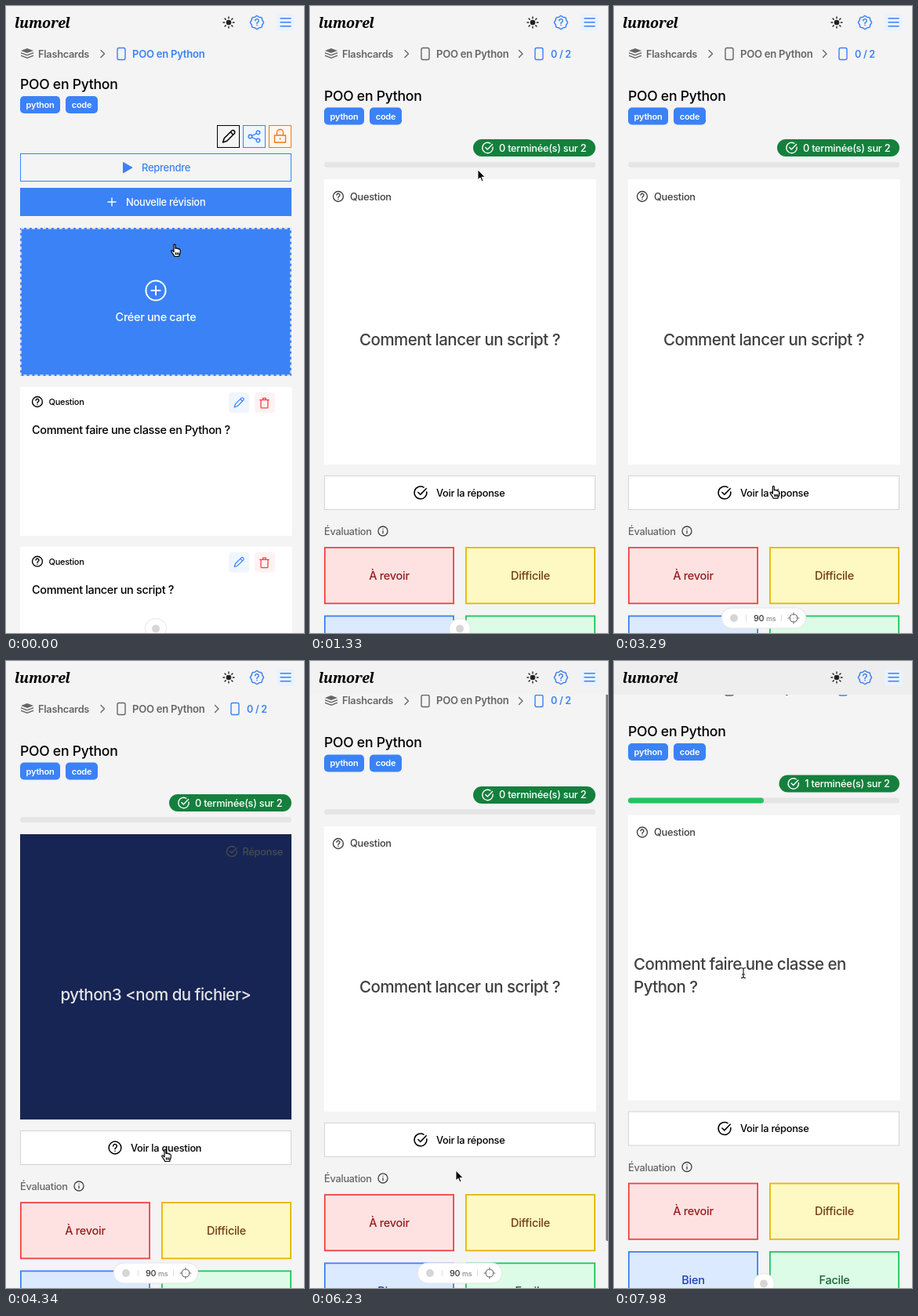
These frames come from a looping animation (380 by 800 pixels, 8 s). An HTML page:

```html
<!DOCTYPE html>
<html lang="fr">
<head>
<meta charset="utf-8">
<title>Flashcards</title>
<style>
html, body { margin: 0; height: 100%; overflow: hidden; background: #f4f4f4; }
svg { display: block; font-family: Inter, "Open Sans", sans-serif; letter-spacing: -.017em; }
text { white-space: pre; }
</style>
</head>
<body>
<svg id="stage" width="380" height="800" viewBox="0 0 380 800"></svg>
<script>
const BLUE = '#3b82f6', GREY = '#666', INK = '#404040';
const stage = document.getElementById('stage');

// Markup helpers
const text = (x, y, s, size, fill, weight = 450, more = '') =>
  `<text x="${x}" y="${y}" font-size="${size}" fill="${fill}" font-weight="${weight}" ${more}>${s}</text>`;
const MID = 'text-anchor="middle"', TIGHT = 'letter-spacing="-.025em"';
const rect = (x, y, w, h, fill, more = '') =>
  `<rect x="${x}" y="${y}" width="${w}" height="${h}" fill="${fill}" ${more}/>`;
const box = (x, y, w, h, fill, line, lw = 1, more = '') =>
  rect(x + lw / 2, y + lw / 2, w - lw, h - lw, fill, `stroke="${line}" stroke-width="${lw}" ${more}`);
const icon = (d, x, y, color, scale = 1, lw = 1.4) =>
  `<path d="${d}" transform="translate(${x} ${y}) scale(${scale})" fill="none" stroke="${color}"
    stroke-width="${lw / scale}" stroke-linecap="round" stroke-linejoin="round"/>`;
const group = (id, s) => `<g id="${id}">${s}</g>`;

const RING = 'M-8.6 0a8.6 8.6 0 1 0 17.2 0a8.6 8.6 0 1 0-17.2 0';
const MARK = 'M-2.6-2.3a2.6 2.6 0 1 1 4 2.2q-1.4.8-1.4 2.1M0 4.6v.1';
const HELP = RING + MARK;
const INFO = RING + 'M0-.5v4.5M0-4v.1';
const PLUS = 'M-5 0h10M0-5v10';
const CHECK = 'M8.5-1.2A8.6 8.6 0 1 1 4.4-7.4M-3.4-.6l3.2 3.2 8-8.4';
const CHEVRON = 'M-2.5-4.5l4.5 4.5-4.5 4.5';
const PHONE = 'M-3-7.5h6q2 0 2 2v11q0 2-2 2h-6q-2 0-2-2v-11q0-2 2-2z';
const PENCIL = 'M-6.5 6.5l1.5-4.5 8.5-8.5q1.5-1 2.7.3t.3 2.7L-2 5zM2-5l3 3';
const TRASH = 'M-6-4h12M-2-4v-2.3h4V-4M-4.7-4v9.5q0 1.3 1.3 1.3h6.8q1.3 0 1.3-1.3V-4';
const SHARE = [[-5, 0], [5, -5], [5, 5]].map(([x, y]) => `M${x - 2.3} ${y}a2.3 2.3 0 1 0 4.6 0a2.3 2.3 0 1 0-4.6 0`).join('') +
  'M-2.8-1l5.6-2.9M-2.8 1l5.6 2.9';
const LOCK = 'M-7-1h14v9h-14zM-4-1v-3.5a4 4 0 0 1 8 0V-1M0 3v1';
const RAYS = [...Array(8)].map((_, i) => {
  const a = i * Math.PI / 4, c = Math.cos(a), s = Math.sin(a);
  return `M${5.3 * c} ${5.3 * s}L${7 * c} ${7 * s}`;
}).join('');
const BADGE = [...Array(64)].map((_, i) => {
  const a = i * Math.PI / 32, r = 7.9 + .55 * Math.cos(8 * a);
  return (i ? 'L' : 'M') + r * Math.cos(a) + ' ' + r * Math.sin(a);
}).join('') + 'z';

const crumbs = color =>
  `<path d="M27 54l8 3-8 3-8-3zM19 59l8 3 8-3v1.5l-8 3-8-3zM19 62.5l8 3 8-3V64l-8 3-8-3z" fill="${GREY}"/>` +
  text(41, 65.5, 'Flashcards', 12.8, GREY, 600) + icon(CHEVRON, 123.5, 61, GREY) +
  icon(PHONE, 147, 61, color) + text(161, 65.5, 'POO en Python', 13.1, color, 600);

const heading = y =>
  text(18, y + 6.5, 'POO en Python', 17.6, '#000') +
  rect(18, y + 15.5, 51, 22, BLUE, 'rx="5"') + text(43.5, y + 30.5, 'python', 11, '#fff', 600, MID) +
  rect(76, y + 15.5, 41, 22, BLUE, 'rx="5"') + text(96.5, y + 30.5, 'code', 11, '#fff', 600, MID);

const listCard = (y, q) =>
  rect(18, y, 347, 190, '#fff') + icon(HELP, 40, y + 19, '#000', .75) +
  text(54.5, y + 23, 'Question', 11, '#000', 500) +
  rect(284, y + 7, 26, 26, '#eff6ff', 'rx="4"') + icon(PENCIL, 297, y + 20, BLUE, .9, 1.2) +
  rect(317, y + 7, 26, 26, '#fef2f2', 'rx="4"') + icon(TRASH, 329.5, y + 20.5, '#ef4444', .95, 1.3) +
  text(33, y + 60, q, 14.5, '#000', 450, TIGHT);

const deckPage = crumbs(BLUE) + heading(99.5) +
  box(269, 152, 29, 29, '#f4f4f4', '#000') + icon(PENCIL, 284, 166.5, '#000', 1.15, 1.5) +
  box(302, 152, 29, 29, '#eff6ff', BLUE) + icon(SHARE, 316.5, 166.5, BLUE) +
  box(335, 152, 29, 29, '#fff7ed', '#f97316') + icon(LOCK, 349.5, 166, '#f97316') +
  box(18, 188, 346, 36, '#f4f4f4', BLUE, 1, 'id="resume"') +
  `<path d="M149.5 199.5l11.5 6.7-11.5 6.7z" fill="${BLUE}" stroke="${BLUE}" stroke-linejoin="round"/>` +
  text(173, 211, 'Reprendre', 13, BLUE, 500) +
  rect(18, 232, 346, 36, BLUE) + icon(PLUS, 135, 250, '#fff') +
  text(153, 254.5, 'Nouvelle révision', 12.9, '#fff', 500) +
  rect(18, 283, 346, 189, BLUE, 'id="fill"') +
  box(18, 283, 346, 189, 'none', '#e0e0e0', 1.8, 'stroke-dasharray="4 3"') +
  group('create', icon(RING, 191, 363, 'currentColor', 1.46, 2) + icon(PLUS, 191, 363, 'currentColor', 1.1, 2) +
    text(191, 401.5, 'Créer une carte', 14.5, 'currentColor', 450, MID + ' ' + TIGHT)) +
  listCard(486, 'Comment faire une classe en Python ?') +
  listCard(689.7, 'Comment lancer un script ?');

const big = (x, y, s, fill, more = '') => text(x, y, s, 20.5, fill, 450, more + ' ' + TIGHT);
const grade = (id, x, y, s, fill, line, ink) =>
  box(x, y, 166, 73, fill, line, 1.8, `id="${id}"`) + text(x + 83, y + 41.5, s, 14.5, ink, 450, MID);

const reviewPage = crumbs(GREY) + icon(CHEVRON, 269, 61, GREY) + icon(PHONE, 292, 61, BLUE) +
  text(307, 65.5, '0 / 2', 12.6, BLUE, 600, 'id="crumb"') + heading(114) +
  rect(208, 170, 156, 22, '#15803d', 'rx="11" id="pill"') +
  group('done', icon(CHECK, 226.5, 181, '#fff', .78) + text(241, 185.5, '', 12.8, '#fff', 500)) +
  rect(18, 199, 346, 7, '#e5e5e5', 'rx="3.5"') + rect(18, 199, 0, 7, '#22c55e', 'rx="3.5" id="bar"') +
  group('front', rect(18, 221, 347, 364, '#fff') + icon(HELP, 36, 243, INK, .75) +
    text(51, 247.5, 'Question', 12.8, INK) +
    group('q1', big(191, 433, 'Comment lancer un script ?', INK, MID)) +
    group('q2', big(25, 418.3, 'Comment faire une classe en', INK) + big(25, 447.3, 'Python ?', INK))) +
  group('back', rect(18, 221, 346, 364, '#172554') + icon(CHECK, 288, 243, '#4a4a52', .75) +
    text(353, 247.5, 'Réponse', 12.8, '#4a4a52', 450, 'text-anchor="end"') +
    big(191, 433, 'python3 &lt;nom du fichier&gt;', '#e5e5e5', MID)) +
  box(18, 599, 346, 44, '#fff', '#d4d4d4') +
  group('ask', icon(CHECK, 141, 621, '#000', .92, 1.5) + text(161, 625.7, 'Voir la réponse', 12.8, '#000', 500)) +
  group('hide', icon(HELP, 139, 621, '#000', .92, 1.5) + text(159, 625.7, 'Voir la question', 12.8, '#000', 500)) +
  text(18, 675, 'Évaluation', 12.8, GREY) + icon(INFO, 93, 670, INK, .7, 1.3) +
  grade('again', 18, 690.2, 'À revoir', '#fee2e2', '#ef4444', '#991b1b') +
  grade('hard', 198, 690.2, 'Difficile', '#fef9c3', '#eab308', '#713f12') +
  grade('good', 18, 777.5, 'Bien', '#dbeafe', BLUE, '#1e40af') +
  grade('easy', 198, 777.5, 'Facile', '#dcfce7', '#22c55e', '#166534');

const header = rect(0, 0, 380, 43, '#f4f4f4', 'id="top"') +
  text(11, 28, 'lumorel', 18, '#000', 700, 'font-family="Noto Serif, serif" font-style="italic"') +
  `<circle cx="284" cy="21" r="3.3" fill="#222"/>` + icon(RAYS, 284, 21, '#222') +
  icon(BADGE, 320, 21, BLUE, 1, 1.5) + icon(MARK, 320, 20.7, BLUE, .85, 1.5) +
  rect(345, 10, 23, 22, '#eaf2fe', 'rx="4"') + icon('M-6.5-5h13M-6.5 0h13M-6.5 5h13', 356.5, 20.7, BLUE, 1, 1.5);

const toolbar = `<clipPath id="clip"><rect id="clipBox" height="26" rx="13"/></clipPath>` +
  `<rect id="panel" height="26" rx="13" fill="#fff" stroke="#e4e4e4"/>` +
  `<g clip-path="url(#clip)"><g id="tools"><circle id="dot" cy="13" r="5" fill="#d6d6d6"/>` +
  group('stats', icon('M31.5 9.5v7M76.5 9.5v7', 0, 0, '#ddd', 1, 1) + text(41, 16.8, '90', 10.8, '#333', 500) +
    text(57, 16.8, 'ms', 9, '#888') +
    icon('M-5 0a5 5 0 1 0 10 0a5 5 0 1 0-10 0M-7 0h3M4 0h3M0-7v3M0 4v3M0 0v.1', 92, 13, '#777', 1, 1.1)) + '</g></g>';

const pointers =
  `<path id="hand" d="M0 1c0-1.3 2-1.3 2 0v4.5c.4-.9 2-.8 2.2.2c.6-.7 1.9-.4 2 .6c.8-.5 2 0 2 1.1v2.8c0 2.4-1.4 2.8-1.5 5.3h-6
    c-.4-2.2-3-4.4-3.9-6.6c-.3-1 1-1.6 1.9-.6L0 9.8zM2.4 10.5v3M4.2 10.5v3M6 10.5v3" fill="#fff" stroke="#000" stroke-width="1.2" stroke-linejoin="round"/>
  <path id="arrow" d="M0 0v13l3-2.8 2 4.8 2-.9-2-4.6h4.2z" fill="#000" stroke="#fff"/>
  <path id="beam" d="M-3-6.5q3 0 3 2v9q0 2-3 2M3-6.5q-3 0-3 2M3 6.5q-3 0-3-2M-2 2h4" fill="none" stroke="#222" stroke-width="1.2"/>`;

stage.innerHTML = group('deck', deckPage) + group('review', reviewPage) +
  rect(377.3, 9, 5, 731, '#7b7b7b', 'rx="2" id="scroll"') + header + toolbar + group('pointer', pointers);

const el = {};
stage.querySelectorAll('[id]').forEach(e => el[e.id] = e);
const set = (id, attrs) => { for (const k in attrs) el[id].setAttribute(k, attrs[k]); };
const show = (id, on) => el[id].style.display = on ? '' : 'none';

// Motion
const ramp = (t, start, len) => Math.max(0, Math.min(1, (t - start) / len));
const ease = (t, start, len) => { const u = ramp(t, start, len); return u * u * (3 - 2 * u); };
const mix = (a, b, p) => `rgb(${a.map((v, i) => Math.round(v + (b[i] - v) * p))})`;
const PAPER = [244, 244, 244];

// start, duration, x, y of each pointer move
const moves = [[70, 350, 214, 204], [1190, 700, 214, 250], [2030, 1400, 202, 623],
  [5950, 280, 186, 650], [6450, 450, 247, 689], [7200, 680, 165, 398]];
const pointerAt = t => moves.reduce(([x, y], [start, len, X, Y]) => {
  const p = ease(t, start, len);
  return [x + (X - x) * p, y + (Y - y) * p];
}, [214, 304]);

function draw(t) {
  const review = t >= 1120, next = t >= 7000;
  const [x, y] = pointerAt(t);
  const scroll = 24.5 * ease(t, 6050, 410);
  const over = (x0, y0, x1, y1) => x > x0 && x < x1 && y + scroll > y0 && y + scroll < y1;

  show('deck', !review);
  show('review', review);
  const leave = ramp(t, 170, 150);
  set('fill', { opacity: 1 - leave });
  el.create.style.color = mix([255, 255, 255], [0, 0, 0], leave);
  set('resume', { fill: mix(PAPER, [239, 246, 255], ramp(t, 320, 150)) });

  set('review', { transform: `translate(0 ${-scroll})` });
  const turn = Math.cos(Math.PI * (ease(t, 3750, 500) - ease(t, 5360, 500)));
  const squeeze = k => ({ transform: `translate(191 0) scale(${Math.max(k, .001)} 1) translate(-191 0)` });
  set('front', squeeze(turn));
  set('back', squeeze(-turn));
  show('front', turn > 0);
  show('back', turn < 0);
  const answer = t >= 3750 && t < 5360;
  show('hide', answer);
  show('ask', !answer);
  show('q1', !next);
  show('q2', next);
  set('pill', { x: next ? 210.5 : 208, width: next ? 153.5 : 156 });
  set('done', { transform: `translate(${next ? 2.3 : 0} 0)` });
  el.done.lastChild.textContent = `${+next} terminée(s) sur 2`;
  el.crumb.textContent = `${+next} / 2`;
  set('bar', { width: 173 * ease(t, 7070, 500) });
  set('hard', { fill: over(198, 690, 364, 763) ? '#fef08a' : '#fef9c3' });
  set('top', { fill: mix(PAPER, [238, 238, 238], scroll / 24.5) });
  set('scroll', { y: 9 + (scroll - 10) * .9, opacity: ramp(t, 6050, 100) * (1 - ramp(t, 6850, 200)) });

  const open = ease(t, 1855, 315) - ease(t, 7250, 315);
  const frame = { x: 191 - 13.5 - 40.5 * open, y: 781.5 - 13.5 * open, width: 27 + 81 * open };
  set('panel', frame);
  set('clipBox', frame);
  set('tools', { transform: `translate(${frame.x} ${frame.y})` });
  set('dot', { cx: 13.5 + 2.5 * open });
  set('stats', { opacity: Math.min(1, open * 2) });

  const hand = review
    ? over(18, 599, 364, 643) || over(18, 690, 184, 763) || over(198, 690, 364, 763)
    : over(18, 188, 364, 224) || over(18, 232, 364, 268) || over(18, 283, 364, 472);
  const beam = review && !hand && (next ? over(25, 400, 295, 455) : over(63, 412, 319, 440));
  show('hand', hand);
  show('beam', beam);
  show('arrow', !hand && !beam);
  set('pointer', { transform: `translate(${x} ${y})` });
}

const STEP = 70;
function tick() {
  draw(Math.floor(performance.now() % 8000 / STEP) * STEP);
  requestAnimationFrame(tick);
}
tick();
</script>
</body>
</html>
```
